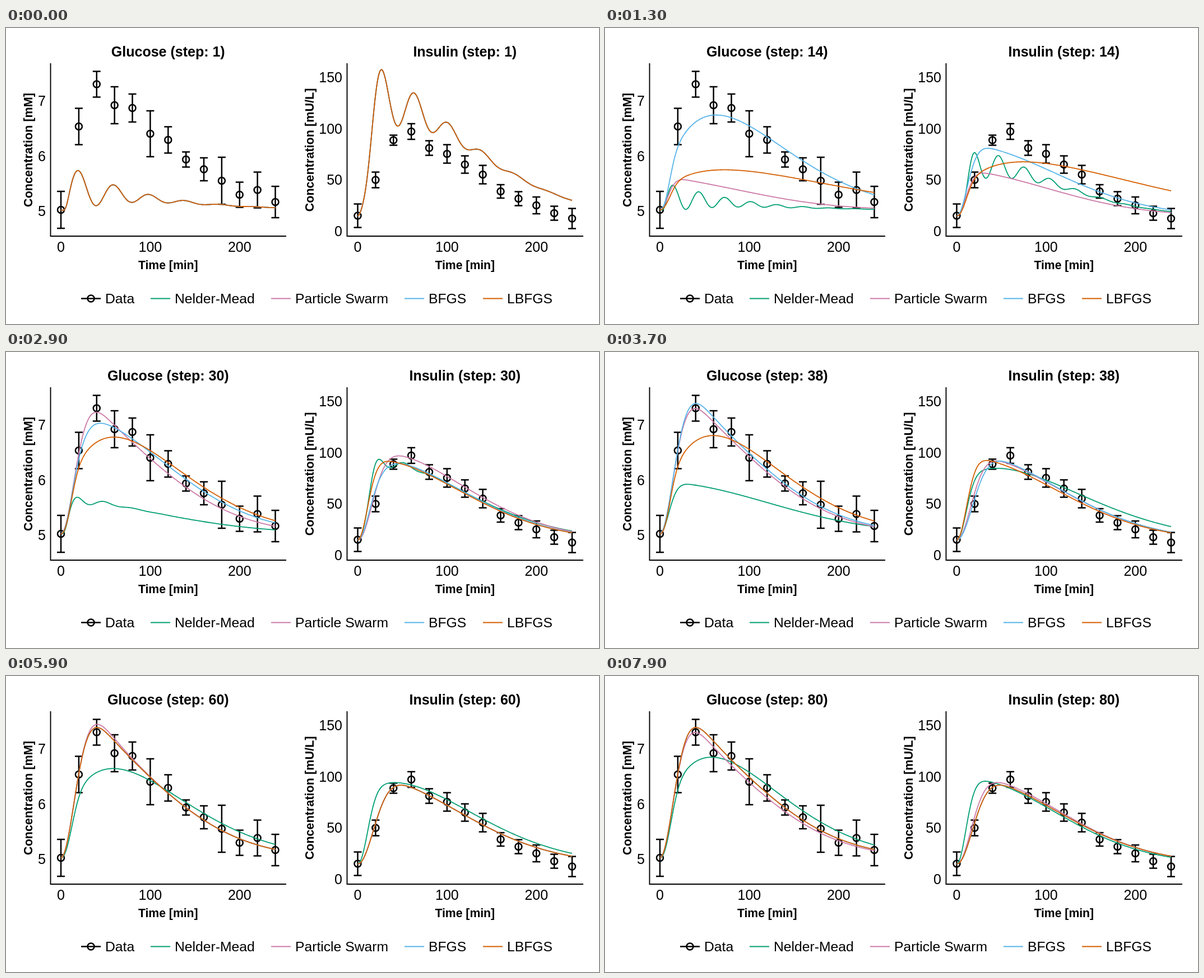
Recreate the animation shown at these times as an HTML page with a canvas. Size 1058x529 px, loop 8 s.

```html
<!DOCTYPE html>
<html lang="en">
<head>
<meta charset="utf-8">
<title>Model fitting</title>
<style>
html, body { margin: 0; width: 100%; height: 100%; overflow: hidden; background: #fff; }
canvas { display: block; width: 1058px; height: 529px; }
</style>
</head>
<body>
<canvas id="stage" width="1058" height="529"></canvas>
<script>
const ctx = document.getElementById('stage').getContext('2d');
const SANS = '"Liberation Sans", Arial, sans-serif';
const STEPS = 80, STEP_MS = 100, MINUTES = 240, WIDTH = 382.5;
const { exp, log, cos, sqrt, min, max, PI } = Math;

// Response above baseline, in pixels, at t minutes: rise, delayed (or ringing) gain, decay.
const response = ({ c, b, power = 2, a, m, tau = 35, period = Infinity, shift = 0 }) => t =>
  c * (1 - exp(-((t / a) ** 2)))
    * (1 - m * exp(-t / tau) * cos(2 * PI * (t - shift) / period))
    * exp(-((t / b) ** power));

// Finds the response that passes through the heights at 20, 40, 100 and 240 minutes.
function fit(h20, h40, h100, h240) {
  let a = 18, m = 0, c, b;
  for (let i = 0; i < 15; i++) {
    const gain = t => 1 - m * exp(-t / 35);
    const l100 = log(h100 / gain(100)), l240 = log(h240 / gain(240));
    const k = (l100 - l240) / (240 ** 2 - 100 ** 2);
    b = 1 / sqrt(k);
    c = exp(l100 + k * 100 ** 2);
    const decay = t => c * exp(-k * t * t);
    const rise = min(0.97, max(0.2, h20 / decay(20) / gain(20)));
    a = 20 / sqrt(-log(1 - rise));
    m = (1 - h40 / decay(40) / (1 - exp(-((40 / a) ** 2)))) / exp(-40 / 35);
  }
  return response({ c, b, a, m });
}

// Each key pairs a step with its glucose and insulin curves.
const key = (step, ...curves) => ({ step, curves });

const first = key(1,
  response({ c: 37, b: 140, power: 1.5, a: 6, m: 1.3, tau: 75, period: 39.8 }),
  response({ c: 218, b: 168, a: 14, m: 0.38, tau: 75, period: 38, shift: 7 }));
const best = key(38, fit(150, 233, 144, 15), fit(73, 137, 105, 14));

const methods = [
  { name: 'Nelder-Mead', color: '#009e73', x: 258, keys: [first,
    key(14,
      response({ c: 22, b: 118, power: 1.5, a: 6, m: 1.25, tau: 110, period: 29.2 }),
      response({ c: 97, b: 152, a: 12.8, m: 0.42, tau: 75, period: 28.8, shift: 4 })),
    key(23,
      response({ c: 37.5, b: 115, power: 1.5, a: 6, m: 1.3, tau: 26, period: 33 }),
      response({ c: 158, b: 142, a: 13.8, m: 0.42, tau: 28, period: 32, shift: 5 })),
    key(38, fit(80, 87, 65, 13), fit(106, 128, 107, 24)),
    key(45, fit(101, 121.5, 86, 11), fit(119, 158, 121, 18)),
    key(60, fit(108, 152.5, 138, 24), fit(118, 145.5, 115, 19)),
    key(80, fit(121, 172, 153, 23), fit(130, 146, 102, 12))] },
  { name: 'Particle Swarm', color: '#cc79a7', x: 473, keys: [first,
    key(14, fit(52, 50.5, 31.5, 3), fit(69, 74.5, 50, 6)),
    key(23, fit(139, 211.5, 131.5, 14), fit(90, 156, 122, 16)),
    key(38, fit(148, 224, 138, 13), fit(84, 140, 104, 14)),
    key(60, fit(151, 238.5, 145, 15), best.curves[1]),
    key(80, fit(148, 224, 135, 13), fit(84, 144, 108, 14))] },
  { name: 'BFGS', color: '#56b4e9', x: 711, keys: [first,
    key(14, fit(112, 157, 150, 27), fit(98, 120, 84, 11)),
    key(23, fit(119, 165, 148, 23.5), fit(105, 134, 100, 13)),
    best] },
  { name: 'LBFGS', color: '#d55e00', x: 851, keys: [first,
    key(14, fit(49, 66, 69, 31), fit(66, 88.5, 94, 45)),
    key(23, fit(116, 162, 147, 24), fit(116, 139, 101, 13)),
    key(38, fit(120, 166, 151, 23), fit(120, 140.5, 99, 13)),
    key(45, fit(125, 167, 140, 20), fit(117, 141, 102, 13)),
    key(60, ...best.curves)] }
];

// Data holds mean and half bar height, one pair per 20 minutes.
const panels = [
  { title: 'Glucose', unit: 'mM', x0: 98, base: 325, axis: 79.5, end: 500, labelX: 47, tickX: 71,
    ticks: [[7, 130], [6, 228.5], [5, 327]],
    data: [325, 33, 176, 32.5, 100.5, 23, 138, 33, 143, 25, 189, 41, 200, 23.5, 235, 13.5,
      252.5, 20.5, 273, 42, 298, 22.5, 289.5, 32, 311, 28] },
  { title: 'Insulin', unit: 'mU/L', x0: 627.5, base: 336, axis: 608.5, end: 1030, labelX: 549, tickX: 600,
    ticks: [[150, 88], [100, 179.5], [50, 271], [0, 363]],
    data: [335.5, 21, 271.5, 14, 200.5, 9, 185, 14, 214.5, 13, 225, 16.5, 244, 15.5, 262, 16.5,
      292, 12, 305, 12.5, 317, 15, 331, 12.5, 340.5, 18] }
];

function text(str, x, y, size, align = 'center', bold = false) {
  ctx.font = `${bold ? 'bold ' : ''}${size}px ${SANS}`;
  ctx.textAlign = align;
  ctx.fillStyle = '#000';
  ctx.fillText(str, x, y);
}

function line(color, width, ...pts) {
  ctx.beginPath();
  for (const [x, y] of pts) ctx.lineTo(x, y);
  ctx.strokeStyle = color;
  ctx.lineWidth = width;
  ctx.stroke();
}

function marker(x, y) {
  ctx.beginPath();
  ctx.arc(x, y, 6, 0, 2 * PI);
  ctx.strokeStyle = '#000';
  ctx.lineWidth = 2.5;
  ctx.stroke();
}

// Blends the two keys around a step; holds the last one.
function curveAt({ keys }, step, panel) {
  const next = keys.findIndex(k => k.step >= step);
  if (next < 0) return keys[keys.length - 1].curves[panel];
  if (next === 0) return keys[0].curves[panel];
  const a = keys[next - 1], b = keys[next];
  const u = (step - a.step) / (b.step - a.step);
  return t => (1 - u) * a.curves[panel](t) + u * b.curves[panel](t);
}

function drawPanel(p, index, step) {
  const px = t => p.x0 + t / MINUTES * WIDTH;
  const mid = px(MINUTES / 2);
  text(`${p.title} (step: ${step})`, mid, 51, 25, 'center', true);
  text('Time [min]', mid, 430.5, 21.2, 'center', true);
  ctx.save();
  ctx.translate(p.labelX, 218);
  ctx.rotate(-PI / 2);
  text(`Concentration [${p.unit}]`, 0, 0, 21.6, 'center', true);
  ctx.restore();

  line('#000', 1.9, [p.axis, 63], [p.axis, 372], [p.end, 372]);
  for (const [v, y] of p.ticks) text(v, p.tickX, y + 9, 25, 'right');
  for (const v of [0, 100, 200]) text(v, px(v), 400, 25);

  for (let i = 0; i < p.data.length; i += 2) {
    const x = px(i * 10), y = p.data[i], r = p.data[i + 1];
    line('#000', 2.5, [x, y - r], [x, y + r]);
    for (const cap of [y - r, y + r]) line('#000', 2.5, [x - 7, cap], [x + 7, cap]);
    marker(x, y);
  }
  for (const m of methods) {
    const curve = curveAt(m, step, index), pts = [];
    for (let t = 0; t <= MINUTES; t++) pts.push([px(t), p.base - curve(t)]);
    line(m.color, 1.8, ...pts);
  }
}

function drawLegend() {
  line('#000', 2.7, [134, 483.5], [169, 483.5]);
  marker(151.5, 483.5);
  text('Data', 177, 492, 24.7, 'left');
  for (const m of methods) {
    line(m.color, 1.8, [m.x, 483.5], [m.x + 35, 483.5]);
    text(m.name, m.x + 43, 492, 24.7, 'left');
  }
}

function draw(step) {
  ctx.fillStyle = '#fff';
  ctx.fillRect(0, 0, 1058, 529);
  panels.forEach((p, i) => drawPanel(p, i, step));
  drawLegend();
}

let shown = 0;
const start = performance.now();
function tick() {
  const step = Math.floor((performance.now() - start) / STEP_MS) % STEPS + 1;
  if (step !== shown) draw(shown = step);
  requestAnimationFrame(tick);
}
tick();
</script>
</body>
</html>
```
